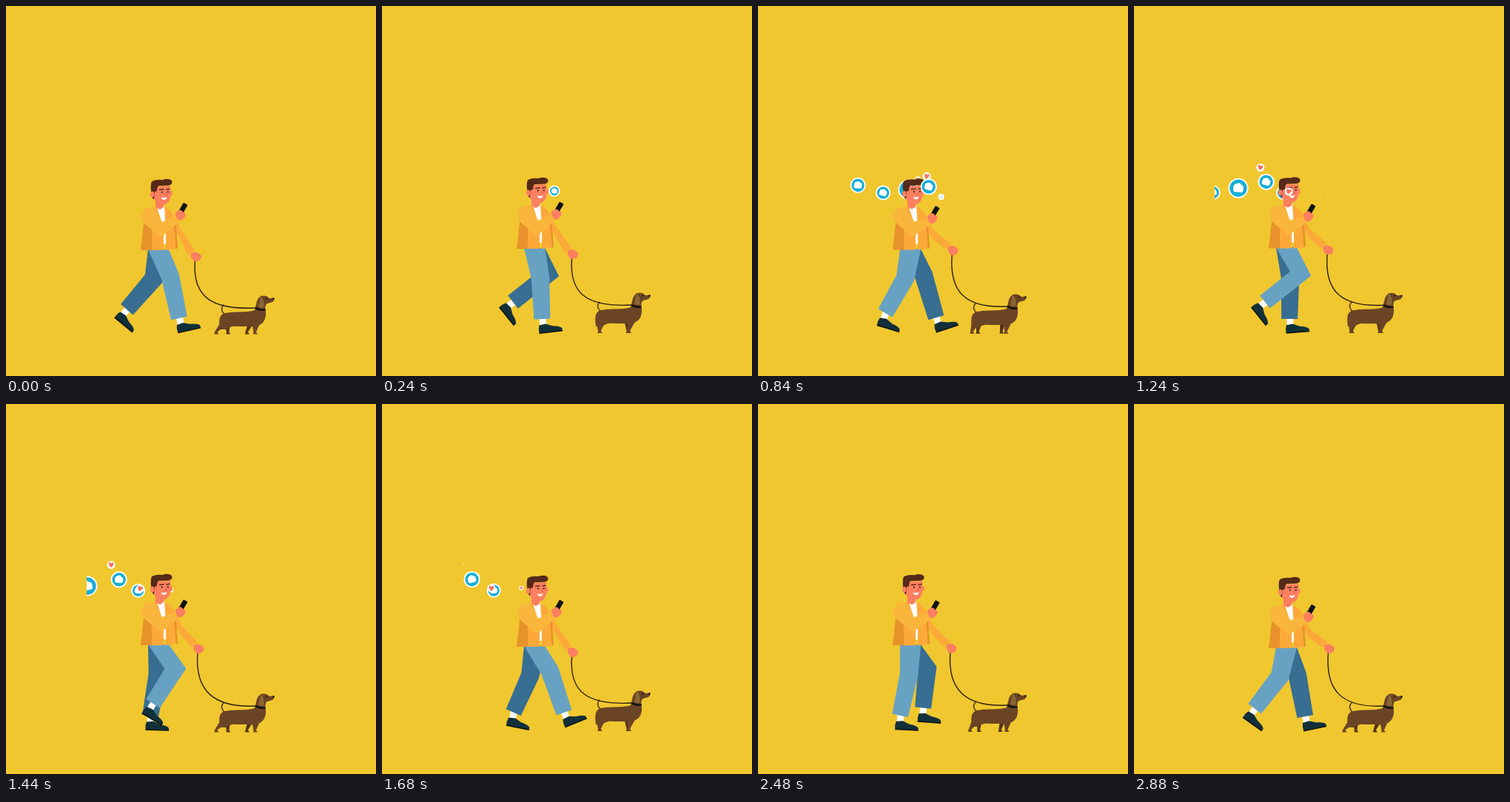
Recreate the animation shown at these times as an HTML page with a canvas. Size 500 by 500 pixels, loop 2920 ms.

```html
<!DOCTYPE html>
<html lang="en">
<head>
<meta charset="utf-8">
<title>Dog walk</title>
<style>
  html, body { margin: 0; width: 100%; height: 100%; overflow: hidden; background: #f0c72f; }
  canvas { display: block; width: 500px; height: 500px; }
</style>
</head>
<body>
<canvas id="stage" width="500" height="500"></canvas>
<script>
const ctx = document.getElementById('stage').getContext('2d');
const LOOP = 2920, STEP = 40, WALK = 1920, TROT = 480;
const TAU = Math.PI * 2;
const C = {
  bg: '#f0c72f', skin: '#fc7f60', hair: '#552a1a', jacket: '#fda93a', shade: '#e8922c',
  sleeve: '#fab63c', jeans: '#68a2c3', jeansDark: '#376e92', shoe: '#123039', black: '#111315',
  dog: '#6b4425', dogDark: '#573618', ear: '#8a6734', blue: '#16aed6', heart: '#f5715c'
};

// Key poses of one stride, shared by both legs.
const stride = [
  { at: 0, knee: 222, x: 234, y: 422, tilt: -13 },
  { at: 480, knee: 206, x: 198, y: 422, tilt: 0 },
  { at: 840, knee: 199, x: 172, y: 415, tilt: 17 },
  { at: 980, knee: 198, x: 163, y: 411, tilt: 38 },
  { at: 1240, knee: 225, x: 177, y: 400, tilt: 51 },
  { at: 1470, knee: 229, x: 203, y: 406, tilt: 26 },
  { at: 1680, knee: 227, x: 246, y: 417, tilt: -22 }
];

// Every second one passes in front of the man.
const bubbles = [
  { born: 86, speed: 0.163, level: 242, size: 10.5 },
  { born: 270, speed: 0.156, level: 252, size: 10 },
  { born: 485, speed: 0.155, level: 246, size: 13.5 },
  { born: 630, speed: 0.13, level: 237, size: 11 },
  { born: 750, speed: 0.115, level: 252, size: 9.5 },
  { born: 630, speed: 0.143, level: 217, size: 5.5, heart: true },
  { born: 440, speed: 0.105, level: 232, size: 4.5, heart: true },
  { born: 888, speed: 0.139, level: 249, size: 5.5, heart: true },
  { born: 1200, speed: 0.145, level: 248, size: 3, heart: true }
];

const clamp = v => Math.max(0, Math.min(1, v));

// Smooth periodic curve through the stride poses.
function pose(t) {
  t = (t % WALK + WALK) % WALK;
  const n = stride.length;
  const i = stride.filter(s => s.at <= t).length - 1;
  const [a, b, c, d] = [-1, 0, 1, 2].map(o => stride[(i + o + n) % n]);
  const gap = (p, q) => (q.at - p.at + WALK) % WALK;
  const span = gap(b, c), u = (t - b.at) / span, u2 = u * u, u3 = u2 * u;
  const mix = k => {
    const m0 = (c[k] - a[k]) / gap(a, c) * span;
    const m1 = (d[k] - b[k]) / gap(b, d) * span;
    return (2 * u3 - 3 * u2 + 1) * b[k] + (u3 - 2 * u2 + u) * m0 +
           (3 * u2 - 2 * u3) * c[k] + (u3 - u2) * m1;
  };
  return { knee: mix('knee'), x: mix('x'), y: mix('y'), tilt: mix('tilt') };
}

function poly(color, ...p) {
  ctx.fillStyle = color;
  ctx.beginPath();
  for (let i = 0; i < p.length; i += 2) ctx.lineTo(p[i], p[i + 1]);
  ctx.closePath();
  ctx.fill();
}
function shape(color, d) {
  ctx.fillStyle = color;
  ctx.fill(new Path2D(d));
}
function line(color, width, d) {
  ctx.strokeStyle = color;
  ctx.lineWidth = width;
  ctx.lineCap = 'round';
  ctx.stroke(new Path2D(d));
}
function oval(color, x, y, rx, ry = rx, rot = 0) {
  ctx.fillStyle = color;
  ctx.beginPath();
  ctx.ellipse(x, y, rx, ry, rot, 0, TAU);
  ctx.fill();
}
function slab(color, x, y, w, h, r) {
  ctx.fillStyle = color;
  ctx.beginPath();
  ctx.roundRect(x, y, w, h, r);
  ctx.fill();
}
function placed(x, y, rot, draw) {
  ctx.save();
  ctx.translate(x, y);
  ctx.rotate(rot);
  draw();
  ctx.restore();
}

function drawLeg(t, bob, color) {
  const { knee: kx, x, y, tilt } = pose(t);
  const hx = 206, hy = 329 + bob, thigh = 40;
  const ky = hy + Math.sqrt(thigh ** 2 - (kx - hx) ** 2);
  placed(x, y, tilt * Math.PI / 180, () => {
    poly('#fff', -4, -4, 5, -4, 5, 10, -4, 10);
    shape(C.shoe, 'M-5 8L4 7Q8 9 13 11Q24 12.5 25.5 16L25 19L-6 19Q-7 13 -5 8Z');
    line(C.black, 1.6, 'M-5.5 18.8L25 18.8');
  });
  const a1 = Math.atan2(ky - hy, kx - hx), a2 = Math.atan2(y - ky, x - kx);
  const mid = (a1 + a2) / 2;
  const w = 12.3 / Math.max(0.85, Math.cos((a2 - a1) / 2));
  const nx = Math.sin(mid) * w, ny = -Math.cos(mid) * w;
  const cx = Math.sin(a2) * 11, cy = -Math.cos(a2) * 11;
  poly(color, hx - 14, hy, hx + 14, hy, kx + nx, ky + ny, x + cx, y + cy,
    x - cx, y - cy, kx - nx, ky - ny);
}

function drawDog(t) {
  const swing = Math.cos(t / TROT * TAU);
  const bob = 2 * swing - 2, ground = 443.5 + bob * 0.4;
  const leg = (color, x, y, w, foot) => {
    poly(color, x - w, y + bob, x + w, y + bob, foot + 2, ground - 3,
      foot + 4, ground, foot - 2, ground, foot - 1.5, ground - 3);
  };
  leg(C.dogDark, 299, 429, 4, 296.5 + 3 * swing);
  leg(C.dogDark, 331, 428, 4, 328.5 - 3.5 * swing);
  leg(C.dog, 295, 429, 6, 288.5 - 5 * swing);
  leg(C.dog, 338, 427, 6, 334.5 + 1.5 * swing);
  placed(0, bob, 0, () => {
    line(C.dogDark, 1.6, 'M297 417C291 414 290 408 294 404');
    shape(C.dog, 'M293 416C304 412 326 415 336 411L339 399C341 393 346 390 352 392L356 395L361 394.5' +
      'Q364 397 360 400L353 402C350 404 350 408 351 413C352 424 347 431 337 433' +
      'L312 433C304 432 302 435 297 437L289 437C288 428 287 420 293 416Z');
    shape(C.ear, 'M344 392C348 394 350 400 349 406Q346 410 341 406Q343 400 344 392Z');
    line(C.dogDark, 0.7, 'M344 392C348 394 350 400 349 406');
    oval(C.black, 352.5, 395.5, 0.9);
    oval(C.black, 361.5, 395.5, 1.2);
    line(C.black, 2.6, 'M338 408.5Q344 411.5 349.5 410.5');
  });
  return bob;
}

function drawLeash(x, y, bob) {
  line('#2c2013', 1.4, `M${x} ${y}C${x - 4} ${y + 50} 279 ${411 + bob} 338 ${408 + bob}`);
}

function drawHead() {
  poly(C.skin, 202, 262, 213, 264, 213, 272, 208, 275, 202, 272);
  shape(C.skin, 'M199 244L222 243L222.5 257Q221 268 211 269Q201 268 199 258Z');
  oval(C.skin, 222.5, 253, 2.2, 3.4);
  shape(C.hair, 'M196 250Q195 241 197 237Q203 234 211 235Q220 232 224 236Q226 241 220 242.5' +
    'L206 243Q204 245 204 250L201 251L200 261Q198 261 197.5 257Z');
  oval(C.skin, 197.8, 254.5, 2.8, 4);
  line(C.hair, 1.4, 'M207.5 248.3L213 247.8');
  line(C.hair, 1.4, 'M217 247.8L221 247.3');
  oval(C.black, 210.8, 251.5, 1);
  oval(C.black, 218.8, 251.3, 1);
  line('#e5634c', 1, 'M216 252L217 255.5L215 256');
  shape('#fff', 'M209.5 258.5Q213 259.5 217.5 258Q216 262.5 213 262Q210.5 261.5 209.5 258.5Z');
}

function drawTorso() {
  poly(C.shade, 188, 276, 200, 272, 200, 330, 182, 330);
  poly('#fff', 203, 271, 215, 271, 217, 322, 212, 322);
  poly(C.jacket, 197, 273, 204, 272, 213, 300, 213, 330, 197, 330);
  poly(C.jacket, 214, 271, 222, 276, 229, 287, 232, 328, 216, 330, 216, 300);
  poly(C.shade, 227, 296, 230, 296, 232, 328, 229.5, 328);
}

function drawFarArm(hx, hy, bob) {
  poly(C.jacket, 224, 280 + bob, 230, 290 + bob, 238, 304 + bob, hx - 2, hy - 9,
    hx - 11, hy - 3, 236, 316 + bob, 228, 300 + bob);
  placed(hx, hy, 0, () => {
    shape(C.skin, 'M-7 -5Q-3 -8 1 -6Q7 -4 7 0Q6 5 1 6Q-4 7 -5 3Q-8 0 -7 -5Z');
  });
}

function drawNearArm(py, bob) {
  const y = py - 272;
  placed(240, py, 0.53, () => slab(C.black, -3.3, -5.5, 6.6, 13, 1));
  shape(C.sleeve, `M188 ${274 + bob}Q196 ${269 + bob} 202 ${275 + bob}L211 ${292 + bob}L227 ${283 + y}` +
    `L234 ${291 + y}L214 ${309 + bob}Q209 ${313 + bob} 203 ${308 + bob}L185 ${292 + bob}Q180 ${282 + bob} 188 ${274 + bob}Z`);
  placed(235.5, 283 + y, 0, () => {
    shape(C.skin, 'M-7 -3L-2 -7Q2 -8 4 -4Q8 -4 7 0Q5 6 -1 7Q-5 6 -7 -3Z');
  });
}

function drawBubble({ born, speed, level, size, heart }, t) {
  const age = t - born;
  if (age <= 0) return;
  const x = 258 - speed * age;
  const y = level + (262 - level) * Math.exp(-age / 170);
  const r = size * clamp(age / 210) * (heart ? clamp((x - 95) / 40) : 1);
  if (x + r < 109) return;
  oval('#fff', x, y, r);
  placed(x, y, Math.sin(age / 260) * 0.35, () => {
    if (heart) {
      if (r < 3) return;
      ctx.scale(r / 6, r / 6);
      shape(C.heart, 'M0 4C-5 0 -4 -4 -1.5 -3.5Q0 -3 0 -1.5Q0 -3 1.5 -3.5C4 -4 5 0 0 4Z');
      return;
    }
    oval(C.blue, 0, 0, Math.max(0, r - 1.8));
    ctx.scale(r / 10, r / 10);
    slab('#fff', -5, -3.5, 10, 7.5, 2.4);
    oval('#fff', -1, -3.2, 3.4, 1.6, -0.3);
  });
}

function drawBubbles(t, front) {
  ctx.save();
  ctx.beginPath();
  ctx.rect(109, 0, 391, 500);
  ctx.clip();
  bubbles.forEach((b, i) => { if (i % 2 === front) drawBubble(b, t); });
  ctx.restore();
}

function draw(t) {
  ctx.fillStyle = C.bg;
  ctx.fillRect(0, 0, 500, 500);
  const bob = 2 * Math.cos(t / WALK * 2 * TAU) - 2;
  const sway = Math.cos(t / WALK * TAU);
  const handX = 260.5 - 3.5 * sway, handY = 335 + 4 * sway + bob;
  const phoneY = 274.5 - 2.5 * sway + bob;

  drawBubbles(t, 0);
  const dogBob = drawDog(t);
  drawLeash(handX - 1.5, handY + 5, dogBob);
  drawLeg(t + WALK / 2 + 40, bob, C.jeansDark);
  drawLeg(t, bob, C.jeans);
  drawFarArm(handX, handY, bob);
  placed(0, bob, 0, () => {
    drawTorso();
    drawHead();
  });
  drawNearArm(phoneY, bob);
  drawBubbles(t, 1);
}

const start = performance.now();
function tick(now) {
  const t = Math.max(0, now - start) % LOOP;
  draw(Math.floor(t / STEP) * STEP);
  requestAnimationFrame(tick);
}
draw(0);
requestAnimationFrame(tick);
</script>
</body>
</html>
```
